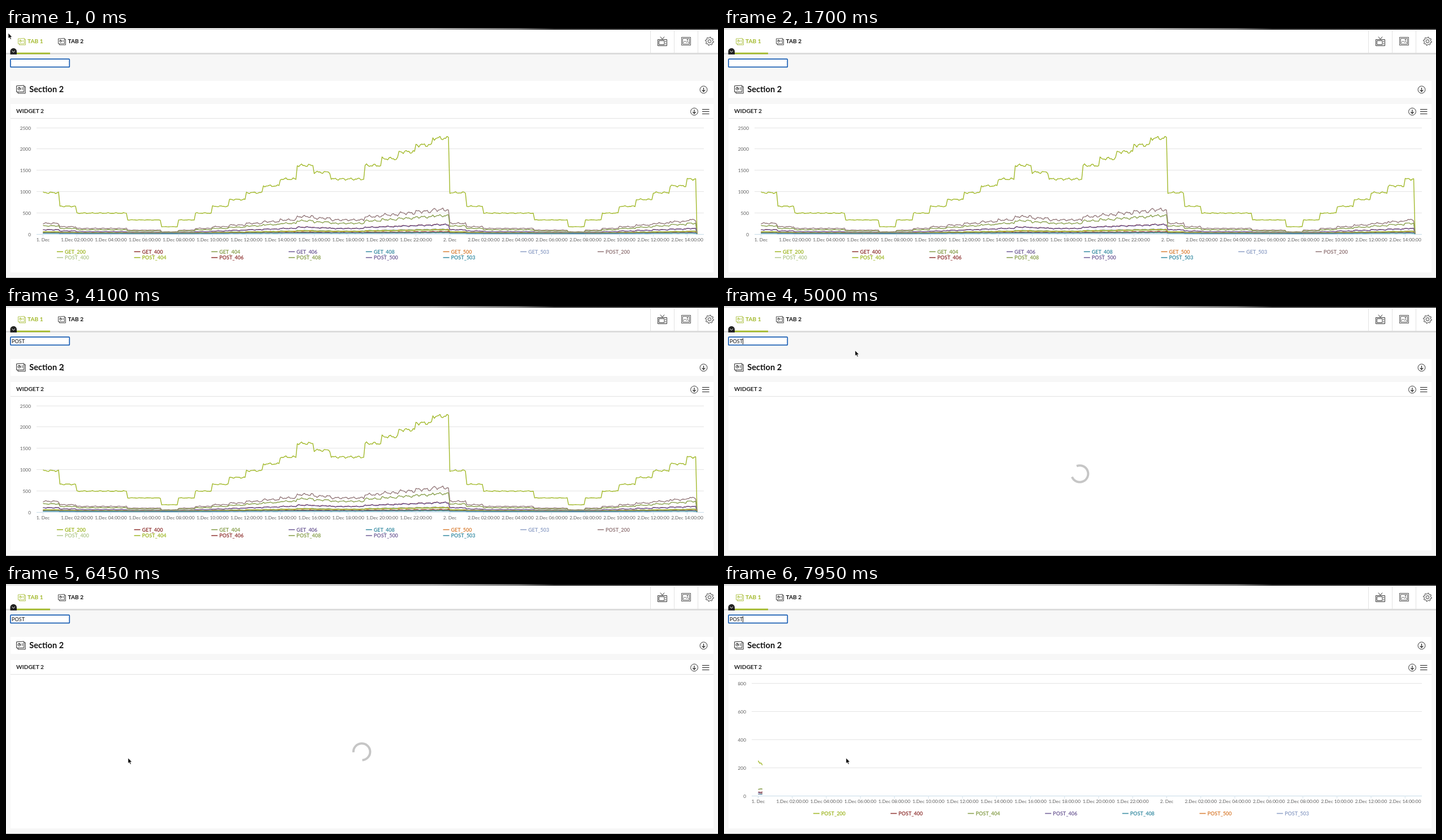
Recreate the animation shown at these times as an HTML page. Size 1260x444 px, loop 8 s.

```html
<!DOCTYPE html>
<html lang="en">
<head>
<meta charset="utf-8">
<title>Dashboard filter</title>
<style>
  html, body { margin: 0; width: 100%; height: 100%; overflow: hidden; background: #f7f7f7; }
  svg { display: block; width: 1260px; height: 444px; font-family: Lato, "Open Sans", sans-serif; }
  .axis { font-size: 8.3px; fill: #606060; }
  .legend { font-size: 9px; font-weight: 700; }
  .icon { fill: none; stroke: #222; stroke-width: .9; }
  .series { fill: none; stroke-width: 1.4; stroke-linejoin: round; }
</style>
</head>
<body>
<svg viewBox="0 0 1260 444">
  <defs>
    <linearGradient id="strip">
      <stop offset="0" stop-color="#e2e2e2"/><stop offset=".35" stop-color="#d6d6d6"/>
      <stop offset=".6" stop-color="#a8a8a8"/><stop offset=".72" stop-color="#6a6a6a"/>
      <stop offset=".77" stop-color="#1c1c1c"/><stop offset="1" stop-color="#161616"/>
    </linearGradient>
    <clipPath id="reveal"><rect id="revealBox" x="49" y="165" width="0" height="215"/></clipPath>
    <g id="pages" fill="none" stroke="currentColor" stroke-width=".8">
      <path d="M.5 1.5L11.5 .8V10.5H.5ZM11.5 2.5H13.5V12.5H2.5V10.5M8 4.5H10M8 6.5H10"/>
      <circle cx="4.5" cy="5.7" r="2"/><path d="M4.5 3.7V5.7H6.5"/>
    </g>
    <g id="download" class="icon">
      <circle r="6.4"/><path d="M0-3.5V3.3M-2.8 .7L0 3.5L2.8 .7" stroke-width="1.2"/>
    </g>
  </defs>

  <rect width="1260" height="444" fill="#f7f7f7"/>
  <rect width="1260" height="3" fill="url(#strip)"/>
  <rect y="3" width="1260" height="41.5" fill="#fff"/>
  <rect y="44" width="1260" height="3" fill="#dcdcdc"/>
  <rect x="8" y="43.7" width="70" height="2.8" fill="#a2b92b"/>
  <path d="M1140.5 4V44M1182.5 4V44M1224.5 4V44" stroke="#e2e2e2"/>
  <path d="M7.5 47V41.5A5.7 5.7 0 0 1 19 41.5V47Z" fill="#222"/>
  <path d="M10.5 40.5L13.2 43L16 40.5" fill="none" stroke="#fff"/>

  <g font-size="10.2" font-weight="700">
    <use href="#pages" x="21" y="17.5" color="#a2b92b"/><text x="38" y="27.3" fill="#a2b92b">TAB 1</text>
    <use href="#pages" x="92" y="17.5" color="#222"/><text x="109.5" y="27.3" fill="#111">TAB 2</text>
  </g>

  <g class="icon">
    <path d="M1153.5 20.5H1169.5V31.5H1153.5ZM1155.5 22.5H1165V29.5H1155.5ZM1158 15.5L1161.5 20L1165 15.5M1167.3 23V25M1167.3 27V29"/>
    <path d="M1195.5 16.5H1211.5V30.5H1195.5ZM1197.5 18.5H1209.5V28.5H1197.5ZM1198 26.5L1201.5 23L1204 25.5L1206 24L1209 26.5" stroke-width=".75"/>
    <circle cx="1206" cy="21" r="1" stroke-width=".7"/>
    <circle cx="1245" cy="23.5" r="2.8"/><path id="gear"/>
  </g>

  <rect x="8" y="55.2" width="104.3" height="14.2" rx="1" fill="#fff" stroke="#1a5fb4" stroke-width="1.7"/>
  <text id="filter" x="10" y="65.6" font-size="9.1" fill="#111"></text>
  <rect id="caret" y="57" width="1" height="11" fill="#111"/>

  <rect x="8" y="94" width="1244" height="30" fill="#fff"/>
  <use href="#pages" transform="translate(18 101) scale(1.2)" color="#222"/>
  <text x="41.3" y="114.2" font-size="14.6" font-weight="700" fill="#111">Section 2</text>
  <use href="#download" x="1234.5" y="109.5"/>

  <rect x="8" y="135" width="1244" height="299" fill="#fff"/>
  <path d="M8 160.5H1252" stroke="#e2e2e2"/>
  <text x="18" y="151" font-size="10.2" font-weight="700" fill="#222">WIDGET 2</text>
  <use href="#download" x="1218" y="148.5"/>
  <path d="M1232 144.5H1244.5M1232 148.5H1244.5M1232 152.5H1244.5" stroke="#222" stroke-width="1.2"/>
  <path d="M0 443.5H1260" stroke="#b4b4b4"/>

  <g id="fullChart"></g>
  <g id="filteredChart"></g>
  <path id="spinner" d="M0-14.8A14.8 14.8 0 1 1-14.8 0" fill="none" stroke="#c6c6c6" stroke-width="4"/>

  <path id="arrow" d="M0 0V9.6L2.2 7.7L3.8 11.3L5.4 10.6L3.9 7.1H6.8Z" fill="#000" stroke="#fff" stroke-width=".7"/>
  <path id="beam" d="M-1.5-5L0-4L1.5-5M-1.5 5L0 4L1.5 5M0-4V4" fill="none" stroke="#222"/>
</svg>

<script>
const LOOP = 8000, STEP = 50;
const $ = id => document.getElementById(id);
const show = (id, on) => $(id).setAttribute('display', on ? 'inline' : 'none');
const smooth = p => p * p * (3 - 2 * p);

const palette = ['#a2b92b', '#943c3a', '#89a04e', '#74629a', '#3d8fa5', '#db843d', '#92a3c8', '#957a7c', '#b5ca92'];
// Load per hour of the day, in units of 160 requests.
const hourly = [6, 4, 3, 3, 3, 2, 2, 1, 2, 3, 4, 5, 6, 7, 8, 10, 9, 8, 8, 10, 11, 12, 13, 14];

function seriesPath(chart, share, jitter, seed) {
  const perHour = 12, count = 463;
  let d = '';
  for (let i = 0; i < count; i++) {
    const base = hourly[Math.floor(i / perHour) % 24] * 160 * share;
    const wobble = Math.sin(i * 1.1 + seed) * .6 + Math.sin(i * 2.3 + 2 * seed) * .4;
    const x = chart.x0 + i * chart.spacing / 24;
    const y = chart.bottom - (base * (1 + jitter * wobble) + chart.floor) * chart.scale;
    d += (i ? 'L' : 'M') + x.toFixed(1) + ' ' + y.toFixed(1);
  }
  return d + `L${chart.x0 + count * chart.spacing / 24} ${chart.bottom}`;
}

function axes(c) {
  let out = '';
  for (let v = 0; v <= c.max; v += c.tick) {
    const y = Math.round(c.bottom - v * c.scale) + .5;
    out += `<path d="M${c.left} ${y}H1235" stroke="${v ? '#e4e4e4' : '#c6dbe8'}"/>
      <text class="axis" x="${c.left - 10}" y="${y + 3}" text-anchor="end">${v}</text>`;
  }
  for (let i = 0; i < 20; i++) {
    const x = c.x0 + i * c.spacing, day = i < 12 ? 1 : 2, hour = i % 12 * 2;
    const label = hour ? `${day}.Dec ${String(hour).padStart(2, '0')}:00:00` : `${day}. Dec`;
    out += `<path d="M${x} ${c.bottom}v5" stroke="#d4e2ec"/>
      <text class="axis" x="${x}" y="${c.bottom + 13}" text-anchor="middle">${label}</text>`;
  }
  return out;
}

function legend(names, x0, y0, perRow) {
  return names.map((name, i) => {
    const x = x0 + i % perRow * 136.7, y = y0 + Math.floor(i / perRow) * 10.4;
    const color = palette[i % palette.length];
    return `<path d="M${x} ${y}h11" stroke="${color}" stroke-width="1.6"/>
      <text class="legend" x="${x + 14}" y="${y + 3.2}" fill="${color}">${name}</text>`;
  }).join('');
}

const lines = (chart, list) => list.map(([color, share, jitter], i) =>
  `<path class="series" stroke="${palette[color]}" d="${seriesPath(chart, share, jitter, 1.2 + i * 2)}"/>`).join('');

const full = { left: 54, x0: 65.5, spacing: 60, bottom: 365.5, scale: .0756, max: 2500, tick: 500, floor: 6 };
const filtered = { left: 49, x0: 60.5, spacing: 60.25, bottom: 376, scale: .2495, max: 800, tick: 200, floor: 3 };
const codes = [200, 400, 404, 406, 408, 500, 503];
const named = method => codes.map(code => `${method}_${code}`);

// Each series: palette index, share of the load, jitter.
$('fullChart').innerHTML = axes(full) + lines(full, [
  [0, 1, .024], [1, .094, .09], [7, .25, .085], [2, .187, .08], [3, .092, .1],
  [6, .046, .1], [5, .04, .12], [8, .036, .1], [0, .041, .12], [1, .02, .2],
  [2, .014, .2], [3, .01, .2], [4, .007, .2]
]) + legend([...named('GET'), ...named('POST')], 90, 397.3, 8);

$('filteredChart').innerHTML = axes(filtered) + `<g clip-path="url(#reveal)">` + lines(filtered, [
  [0, .237, .1], [1, .024, .12], [2, .046, .06], [3, .018, .15], [4, .008, .1], [5, .012, .1], [6, .01, .1]
]) + '</g>' + legend(named('POST'), 158, 407.5, 8);

$('gear').setAttribute('d', 'M' + Array.from({ length: 32 }, (_, i) => {
  const a = (i + .5) * Math.PI / 16, r = i % 4 < 2 ? 7.4 : 5.6;
  return (1245 + r * Math.cos(a)).toFixed(1) + ' ' + (23.5 + r * Math.sin(a)).toFixed(1);
}).join('L') + 'Z');

// Pointer stops: time, x, y.
const stops = [[0, 4, 9], [50, 4, 9], [850, 12, 59], [2950, 284, 353], [3000, 284, 353], [3750, 101, 110],
  [4400, 101, 110], [5000, 232, 79], [5200, 232, 79], [5750, 216, 309], [LOOP, 216, 309]];

function pointerAt(t) {
  const i = stops.findIndex(s => s[0] > t), [t0, x0, y0] = stops[i - 1], [t1, x1, y1] = stops[i];
  const p = smooth((t - t0) / (t1 - t0));
  return [x0 + (x1 - x0) * p, y0 + (y1 - y0) * p];
}

const keyTimes = [1850, 2000, 2200, 2650];
const caretX = [11, 16, 23, 28, 33];

function draw(t) {
  const typed = keyTimes.filter(k => t >= k).length;
  $('filter').textContent = 'POST'.slice(0, typed);
  const typing = typed > 0 && typed < 4;
  const blinkStart = typed ? 2600 : 200;
  show('caret', typing || (t - blinkStart + 1000) % 1000 < 500);
  $('caret').setAttribute('x', caretX[typed]);

  show('fullChart', t < 4250);
  show('spinner', t >= 4400 && t < 7800);
  $('spinner').setAttribute('transform', `translate(629.6 298) rotate(${(t - 5000) / 805 * 360 - 22})`);
  show('filteredChart', t >= 7800);
  const p = Math.max(0, t - 7869) / 1000;
  $('revealBox').setAttribute('width', 1186 * (1 - Math.cos(Math.PI * p)) / 2);

  const [x, y] = pointerAt(t);
  const visible = t < 1350 || t >= 3000;
  const overInput = x > 8 && x < 112 && y > 54 && y < 70;
  const overTitle = x > 40 && x < 103 && y > 100 && y < 119;
  const isBeam = overInput || overTitle;
  show('arrow', visible && !isBeam);
  show('beam', visible && isBeam);
  for (const id of ['arrow', 'beam']) $(id).setAttribute('transform', `translate(${x} ${y})`);
}

let start;
function frame(now) {
  start ??= now;
  draw(Math.floor((now - start) % LOOP / STEP) * STEP);
  requestAnimationFrame(frame);
}
draw(0);
requestAnimationFrame(frame);
</script>
</body>
</html>
```
